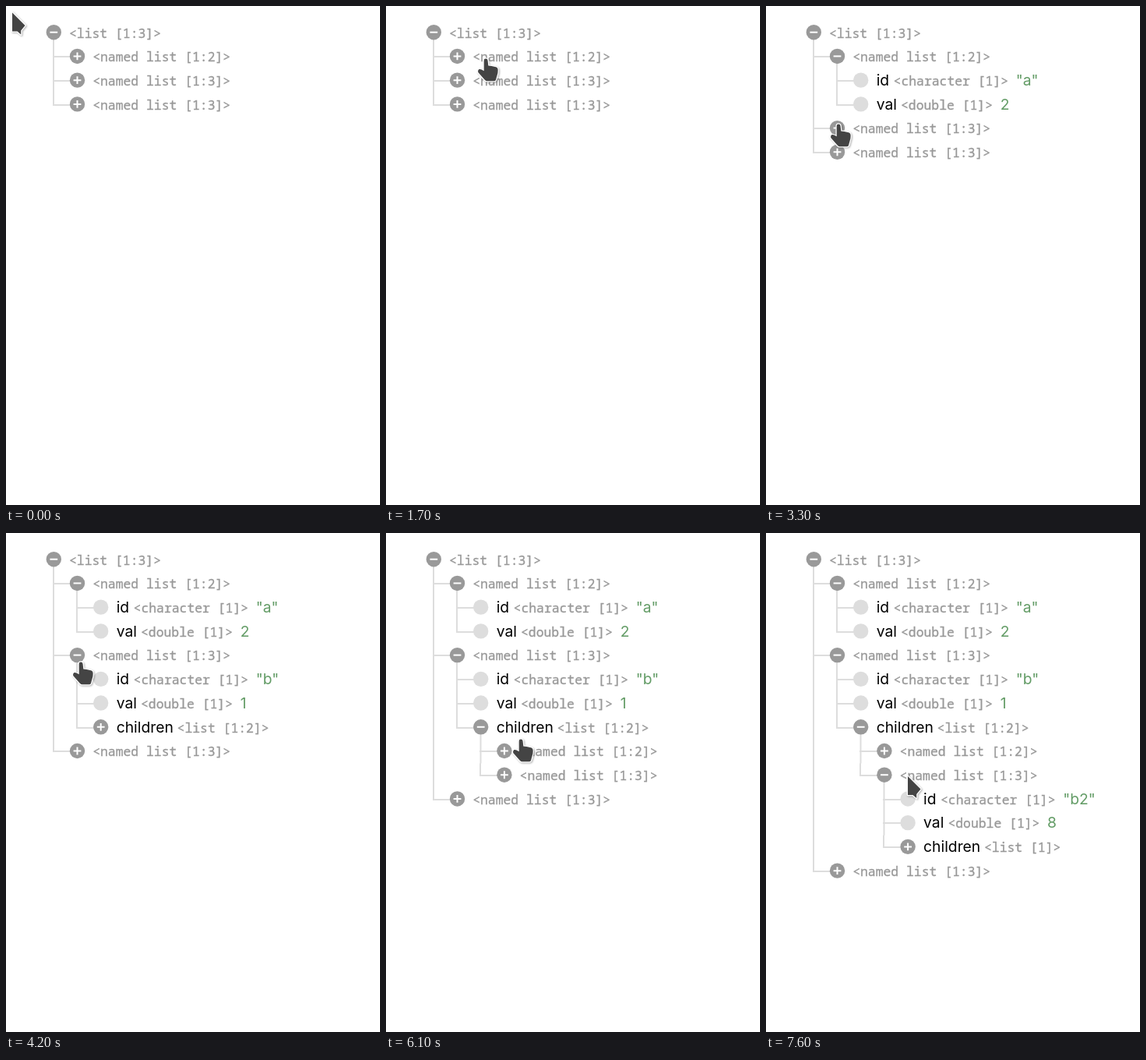
An HTML page that plays this animation: 480x640 px, repeating every 8 s.

```html
<!DOCTYPE html>
<html lang="en">
<head>
<meta charset="utf-8">
<title>List viewer</title>
<style>
  html, body { margin: 0; width: 100%; height: 100%; overflow: hidden; background: #fff; }
  svg { display: block; }
  text { white-space: pre; }
  .type { font: 16.4px "Noto Sans Mono", "Liberation Mono", monospace; fill: #999; stroke: #999; stroke-width: .35; }
  .label, .value { font: 19.3px Inter, Arial, sans-serif; }
  .value { fill: #639c66; }
  .line { fill: none; stroke: #ddd; stroke-width: 2; }
  .sign { fill: none; stroke: #fff; stroke-width: 2; }
  #cursor { fill: #444; stroke: #fff; stroke-width: 2.6; stroke-linejoin: round; paint-order: stroke;
            filter: drop-shadow(1px 1.5px 1.2px rgba(0, 0, 0, .3)); }
</style>
</head>
<body>
<svg width="480" height="640" viewBox="0 0 480 640">
  <g id="tree"></g>
  <path id="cursor"/>
</svg>
<script>
const LOOP = 8000, TICK = 100;
const LEFT = 61.3, TOP = 34, INDENT = 30.2, ROW = 30.725, CHAR = 9.84;
const TYPE_OFFSET = { '': 19.7, id: 41.9, val: 51.3, children: 97.9 };

const leaf = (label, type, value) => ({ label, type, value });
const branch = (label, type, opensAt = Infinity, children = []) => ({ label, type, opensAt, children });

const root = branch('', 'list [1:3]', 0, [
  branch('', 'named list [1:2]', 2200, [
    leaf('id', 'character [1]', '"a"'),
    leaf('val', 'double [1]', '2')
  ]),
  branch('', 'named list [1:3]', 3700, [
    leaf('id', 'character [1]', '"b"'),
    leaf('val', 'double [1]', '1'),
    branch('children', 'list [1:2]', 5600, [
      branch('', 'named list [1:2]'),
      branch('', 'named list [1:3]', 7500, [
        leaf('id', 'character [1]', '"b2"'),
        leaf('val', 'double [1]', '8'),
        branch('children', 'list [1]')
      ])
    ])
  ]),
  branch('', 'named list [1:3]')
]);

const linear = p => p;
const easeOut = p => 1 - (1 - p) ** 2;
const easeInOut = p => (1 - Math.cos(Math.PI * p)) / 2;

// Pointer stops: time, x, y, easing towards this stop
const stops = [
  [0, 7.5, 9, linear], [700, 7.5, 9, linear], [1700, 128, 68, easeInOut],
  [2600, 128, 68, linear], [2700, 116.5, 99.5, linear], [3100, 93.5, 151, easeOut],
  [3200, 93.5, 151, linear], [3300, 93, 152, linear],
  [4100, 93, 152, linear], [4200, 96, 166, linear], [4900, 171.5, 258, easeOut],
  [5100, 171.5, 258, linear], [5200, 173, 258, linear],
  [6000, 173, 258, linear], [6100, 173, 265, linear], [6500, 175, 294, linear],
  [6600, 175, 294, linear], [6900, 181.5, 312.5, linear], [LOOP, 181.5, 312.5, linear]
];

const ARROW = 'M.5 -.5V23.5H7L11.7 27.6V22.5L17 16Z';
const HAND = 'M-2.3 2Q-2.3 -.4 0 -.4Q2.3 -.4 2.6 2L3.3 8.5Q12.5 9.5 14.5 11Q16.3 12.3 15.4 18L13 26.8' +
  'Q12.5 28.3 10.5 28.3H2Q.3 28.3 -1.2 26.8L-9.8 17Q-10.6 14.5 -8.5 13Q-6.5 12.5 -2.3 15.3Z';

const tree = document.getElementById('tree');
const cursor = document.getElementById('cursor');

function pointerAt(t) {
  const i = stops.findIndex(stop => stop[0] > t);
  const [t0, x0, y0] = stops[i - 1], [t1, x1, y1, ease] = stops[i];
  const p = ease((t - t0) / (t1 - t0));
  return [x0 + (x1 - x0) * p, y0 + (y1 - y0) * p];
}

function drawTree(t) {
  const rows = [];
  let lines = '', marks = '';

  const snapLine = y => Math.round(y + .45);
  const text = (kind, x, y, content) =>
    `<text class="${kind}" x="${x}" y="${Math.round(y + 6.5)}">${content}</text>`;

  function visit(node, depth) {
    const x = LEFT + INDENT * depth, y = TOP + ROW * rows.length;
    const open = node.opensAt <= t;
    const typeX = x + TYPE_OFFSET[node.label];
    const right = typeX + CHAR * (node.type.length + 2);
    rows.push({ x, y, right, clickable: !!node.children });

    const markY = y - .3;
    marks += `<circle cx="${x}" cy="${markY}" r="9.7" fill="${node.children ? '#999' : '#ddd'}"/>`;
    if (node.children) {
      marks += `<path class="sign" d="M${x - 4.9} ${markY}h9.8${open ? '' : `M${x} ${markY - 4.9}v9.8`}"/>`;
    }
    if (node.label) marks += text('label', x + 20, y, node.label);
    marks += text('type', typeX, y, `&lt;${node.type}&gt;`);
    if (node.value) marks += text('value', right + 9.6, y, node.value);

    if (open) {
      const trunk = Math.floor(x), shift = depth > 1 ? .5 : 0;
      let end = y;
      for (const child of node.children) {
        end = visit(child, depth + 1);
        lines += `M${trunk - 1} ${snapLine(end)}h${INDENT}`;
      }
      lines += `M${trunk + shift} ${y}V${end - 15}M${trunk} ${end - 15}V${snapLine(end)}`;
    }
    return y;
  }

  visit(root, 0);
  tree.innerHTML = `<path class="line" d="${lines}"/>${marks}`;
  return rows;
}

function draw(t) {
  const rows = drawTree(t);
  const [x, y] = pointerAt(t);
  const hovering = t < 7600 && rows.some(row =>
    row.clickable && Math.abs(y - row.y) < ROW / 2 && x > row.x - 10 && x < row.right);
  cursor.setAttribute('d', hovering ? HAND : ARROW);
  cursor.setAttribute('transform', `translate(${x} ${y})`);
}

const start = performance.now();
let shown = -1;
function frame() {
  const t = Math.floor((performance.now() - start) % LOOP / TICK) * TICK;
  if (t !== shown) draw(shown = t);
  requestAnimationFrame(frame);
}
frame();
</script>
</body>
</html>
```
